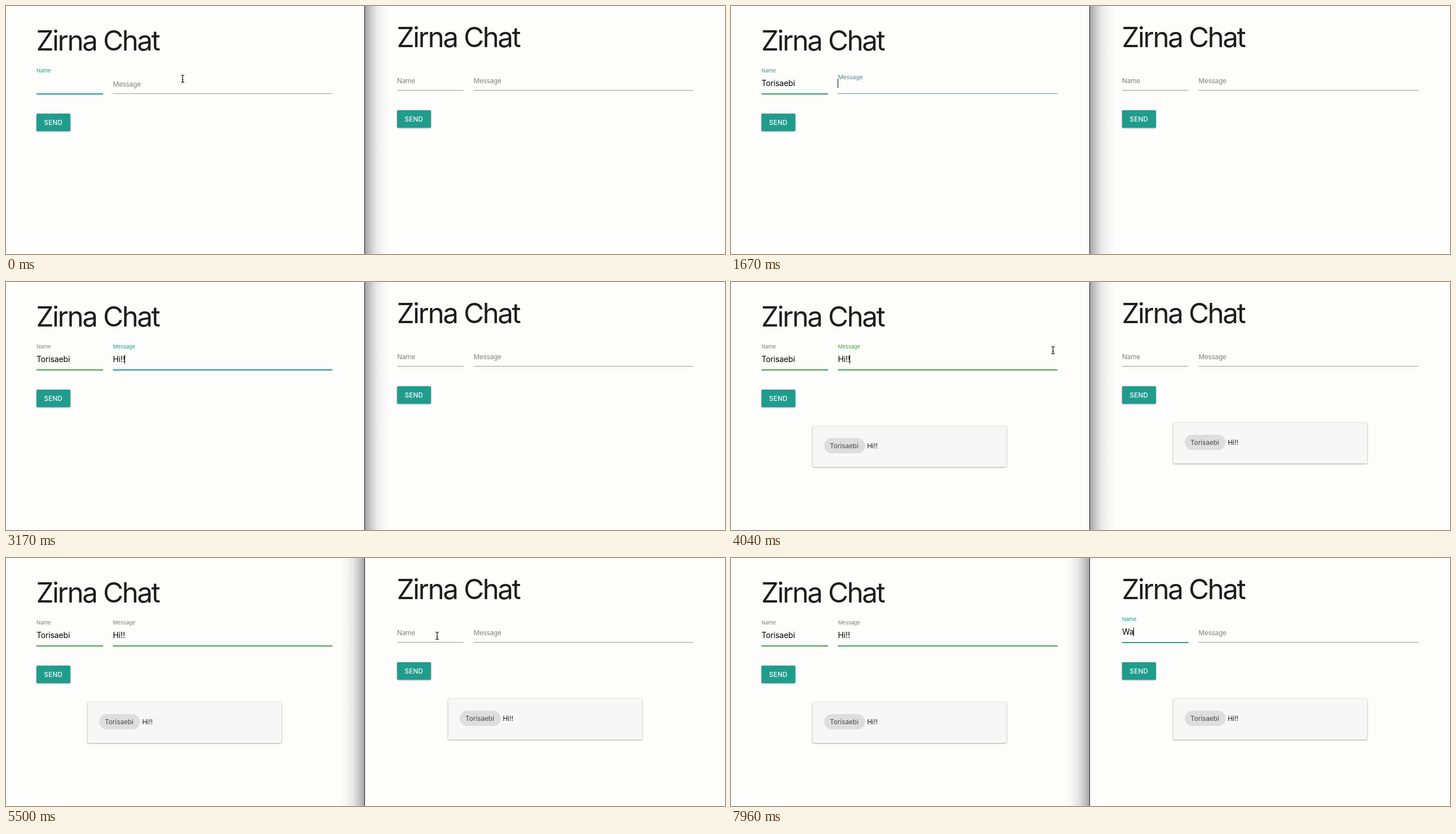
Write an HTML page that moves like this. It is 1274x440 px and loops after 8 s.

```html
<!DOCTYPE html>
<html lang="en">
<head>
<meta charset="utf-8">
<title>Zirna Chat</title>
<style>
  html, body { margin: 0; height: 100%; overflow: hidden; background: #fdfdfc; }
  svg { display: block; width: 1274px; height: 440px; }
  text { font-family: Inter, "Liberation Sans", sans-serif; font-optical-sizing: none; white-space: pre; }
  .title { font-size: 49.4px; letter-spacing: -.05em; fill: #1d1d1d; }
  .label { font-size: 11.8px; letter-spacing: -.02em; }
  .input { font-size: 14px; letter-spacing: -.01em; }
  .send { font-size: 11.5px; font-weight: 500; letter-spacing: .03em; fill: #fff; }
  .chip { font-size: 11.6px; font-weight: 500; fill: #5c5c5c; }
  .said { font-size: 12px; fill: #1a1a1a; }
  .button { fill: #209c8d; }
  .card { fill: #f7f7f7; }
  .button, .card { filter: drop-shadow(0 1.3px .8px rgba(0,0,0,.24)) drop-shadow(0 .6px 1.6px rgba(0,0,0,.2)); }
</style>
</head>
<body>
<svg viewBox="0 0 1274 440">
  <defs>
    <linearGradient id="shade">
      <stop offset="0" stop-color="#101018" stop-opacity=".37"/>
      <stop offset=".2" stop-color="#101018" stop-opacity=".23"/>
      <stop offset=".45" stop-color="#101018" stop-opacity=".09"/>
      <stop offset=".7" stop-color="#101018" stop-opacity=".03"/>
      <stop offset="1" stop-color="#101018" stop-opacity="0"/>
    </linearGradient>
  </defs>
  <g id="scene"></g>
</svg>
<script>
const LOOP = 8000, NEVER = Infinity;
const SENT = 3250, SWITCH = 4930;
const USER = 'Torisaebi';
const GREY = [130, 130, 130], LINE = [154, 154, 154], TEAL = [33, 157, 143], GREEN = [67, 160, 71];

const left = {
  x: 0, y: 0, sent: SENT,
  fields: [
    { x: 54, w: 118, label: 'Name', text: USER, focus: -700, blur: 1610, valid: 1610,
      keys: [...USER].map((_, i) => 250 + i * 140) },
    { x: 189.5, w: 389, label: 'Message', text: 'Hi!!', focus: 1610, blur: 5000, valid: SENT,
      keys: [2100, 2300, 2600, 2850] }
  ]
};
const right = {
  x: 639, y: -6, sent: SENT + 80,
  fields: [
    { x: 54, w: 117.5, label: 'Name', text: 'Wa', focus: 6100, blur: NEVER, valid: NEVER, keys: [7620, 7800] },
    { x: 189.5, w: 389, label: 'Message', text: '', focus: NEVER, blur: NEVER, valid: NEVER, keys: [] }
  ]
};

// Pointer path: time, x, y
const path = [[3800, 313, 129], [4040, 570, 121], [4400, 760, 130], [4960, 783, 131], [5200, 764, 138]];

const pen = document.createElement('canvas').getContext('2d');
pen.font = '14px Inter, "Liberation Sans", sans-serif';
pen.letterSpacing = '-.14px';

const clamp = v => Math.max(0, Math.min(1, v));
const lerp = (a, b, p) => a + (b - a) * p;
const easeOut = p => 1 - (1 - clamp(p)) ** 2;

const text = (cls, x, y, s, extra = '') => `<text class="${cls}" x="${x}" y="${y}" ${extra}>${s}</text>`;
const rect = (x, y, w, h, extra) => `<rect x="${x}" y="${y}" width="${w}" height="${h}" ${extra}/>`;

// Blend through a list of [time, colour] changes
function tint(color, changes, t) {
  for (const [at, next] of changes) {
    const p = easeOut((t - at) / 220);
    color = color.map((c, i) => lerp(c, next[i], p));
  }
  return `rgb(${color.map(Math.round)})`;
}

function field(f, t) {
  const rise = easeOut((t - f.focus) / 200);
  const done = f.keys.filter(k => k <= t);
  const typed = f.text.slice(0, done.length);
  const lineColor = tint(LINE, [[f.focus, TEAL], [f.valid, GREEN]], t);
  const labelColor = tint(GREY, [[f.focus, TEAL], [f.valid, GREEN], [f.blur, GREY]], t);
  const lastEdit = done.length ? done.at(-1) : f.focus;
  const caret = t >= f.focus && t < f.blur && (t - lastEdit) % 1000 < 500;
  const place = `translate(${f.x} ${lerp(143, 118.3, rise)}) scale(${lerp(1, .8, rise)})`;
  return text('label', 0, 0, f.label, `transform="${place}" fill="${labelColor}"`)
    + text('input', f.x, 142, typed)
    + rect(f.x, 155, f.w, 1, `fill="${lineColor}"`)
    + rect(f.x, 156, f.w, 1, `fill="${lineColor}" opacity="${clamp((t - f.focus) / 300) ** 2}"`)
    + (caret ? rect(Math.floor(f.x + pen.measureText(typed).width), 129.5, 1, 15.5, '') : '');
}

function card() {
  return rect(144.5, 256, 343.5, 72, 'rx="1.8" class="card"')
    + rect(165, 277, 72.5, 27, 'rx="13.5" fill="#dedede"')
    + text('chip', 175, 294.6, USER)
    + text('said', 241.2, 294.6, 'Hi!!');
}

function panel(p, t) {
  return `<g transform="translate(${p.x} ${p.y})">`
    + text('title', 53.5, 79, 'Zirna Chat')
    + p.fields.map(f => field(f, t)).join('')
    + rect(54, 191, 60, 31, 'rx="1.8" class="button"')
    + text('send', 67.5, 210.7, 'SEND')
    + (t >= p.sent ? card() : '') + '</g>';
}

function divider(t) {
  const shown = lerp(.3, 1, easeOut((t - SWITCH - 30) / 200));
  const shadow = t < SWITCH
    ? rect(0, 0, 45, 440, 'fill="url(#shade)" transform="translate(636 0)"')
    : rect(0, 0, 45, 440, `fill="url(#shade)" transform="translate(635 0) scale(-1 1)" opacity="${shown}"`);
  return shadow + rect(635, 0, 1, 440, 'fill="#1c1c20"');
}

function pointer(t) {
  const hidden = t >= 250 && t < path[0][0] || t >= 7620;
  if (hidden) return '';
  let [, x, y] = path[0];
  for (let i = 1; i < path.length; i++) {
    const [t0, x0, y0] = path[i - 1], [t1, x1, y1] = path[i];
    if (t < t0) break;
    const p = clamp((t - t0) / (t1 - t0));
    x = lerp(x0, x1, p);
    y = lerp(y0, y1, p);
  }
  const beam = x < 579 || t > 5000;
  const shape = beam
    ? '<path d="M-3-6.5Q0-6.5 0-4.5Q0-6.5 3-6.5M0-5V5M-3 6.5Q0 6.5 0 4.5Q0 6.5 3 6.5M-1.5 2H1.5" fill="none" stroke="#111" stroke-width="1.2"/>'
    : '<path d="M0 0V12L2.7 9.5L4.6 14L6.7 13L4.8 8.8H8.4Z" fill="#000" stroke="#fff" stroke-width=".8"/>';
  return `<g transform="translate(${x} ${y})">${shape}</g>`;
}

const scene = document.getElementById('scene');
function draw(now) {
  const t = now % LOOP;
  scene.innerHTML = divider(t) + panel(left, t) + panel(right, t) + pointer(t);
  requestAnimationFrame(draw);
}
draw(0);
</script>
</body>
</html>
```
